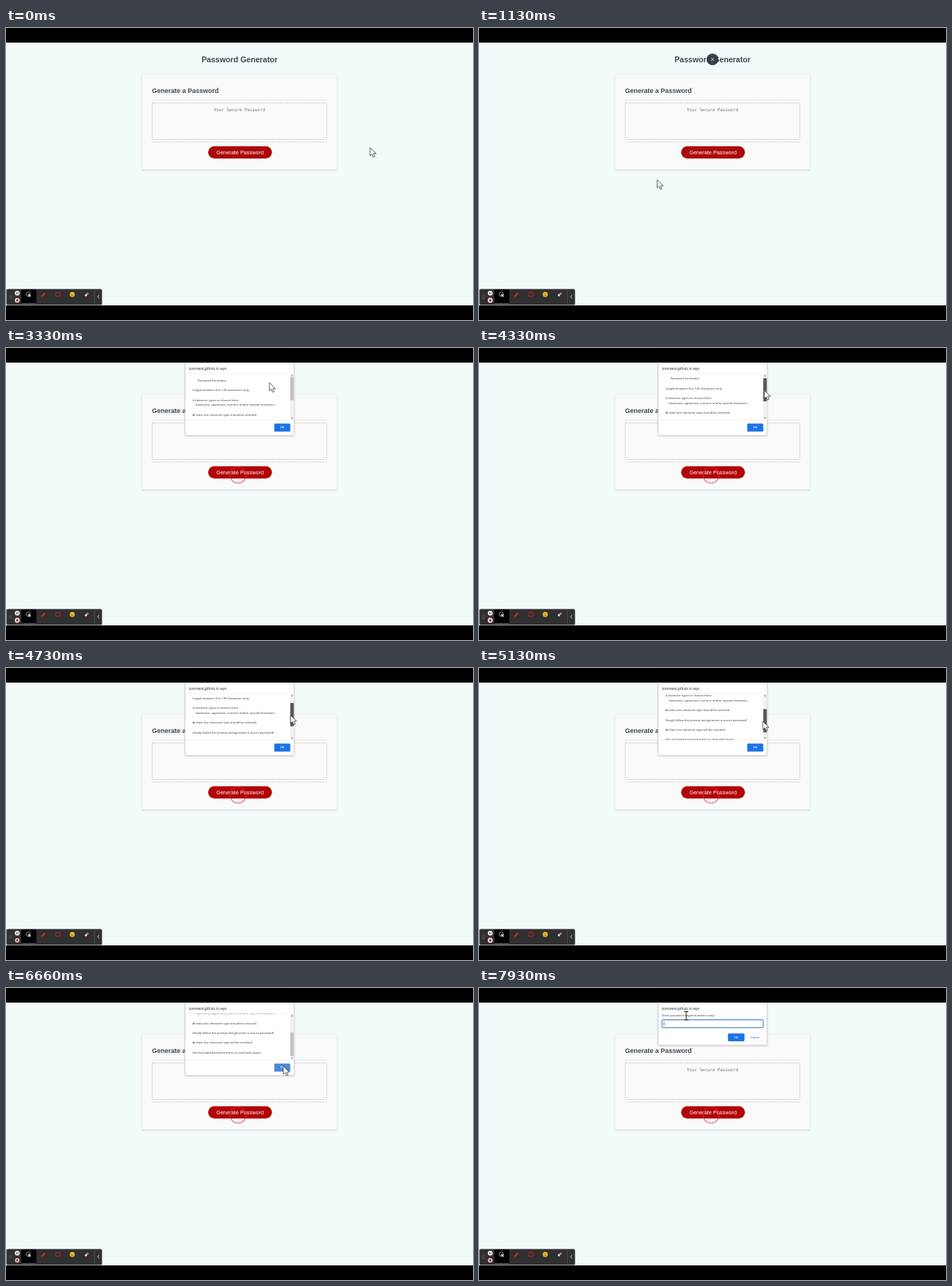
An HTML page for the animation above (8 s loop, 640x400 px).

```html
<!DOCTYPE html>
<html lang="en">
<head>
<meta charset="utf-8">
<title>Password Generator</title>
<style>
html, body { margin: 0; width: 100%; height: 100%; overflow: hidden; background: #000; }
svg { display: block; width: 640px; height: 400px; }
text { font-family: "Open Sans", "Noto Sans", sans-serif; white-space: pre; }
.page { font-family: "Liberation Sans", Arial, sans-serif; }
.mono { font-family: "DejaVu Sans Mono", monospace; }
.mid { text-anchor: middle; }
.bold { font-weight: 700; }
.body { font-size: 4.1px; fill: #333; }
.says { font-size: 4.7px; fill: #202124; }
.btn { font-size: 3.7px; font-weight: 600; text-anchor: middle; }
.tool { font-size: 2.7px; font-weight: 700; fill: #fff; text-anchor: middle; }
.cursor { fill: #fff; stroke: #333; stroke-width: .8; stroke-linejoin: round; }
</style>
</head>
<body>
<svg viewBox="0 0 640 400">
  <defs>
    <filter id="shadow" x="-10%" y="-10%" width="120%" height="125%">
      <feDropShadow dx="0" dy=".7" stdDeviation="1.3" flood-opacity=".22"/>
    </filter>
    <clipPath id="scrollArea"><rect x="246" y="35.2" width="143.5" height="63.2"/></clipPath>
  </defs>

  <rect y="20" width="640" height="360" fill="#f3fafa"/>
  <text class="page bold mid" x="320" y="46.8" font-size="10.667" fill="#3b4a54">Password Generator</text>

  <rect x="186.67" y="64" width="266.67" height="129.8" rx="1.7" fill="#fafafa" filter="url(#shadow)"/>
  <text class="page bold" x="200" y="88.6" font-size="9" fill="#3b4a54">Generate a Password</text>
  <path d="M200 98.9H440M200 156.3H440" stroke="#d5d8da" stroke-width=".7"/>
  <rect x="200.3" y="102.8" width="239.4" height="49.8" rx="1.5" fill="none" stroke="#b4b8ba" stroke-width=".75" stroke-dasharray="2 1.33"/>
  <text class="mono mid" x="320" y="114.4" font-size="5.85" fill="#757575">Your Secure Password</text>
  <rect id="generate" x="277" y="162" width="87.5" height="16.7" rx="8.35"/>
  <text class="page mid" x="320.7" y="172.8" font-size="7.333" fill="#fff">Generate Password</text>
  <circle id="ripple" cx="318" cy="174" fill="none" stroke="#e5303c" stroke-width="1.1" opacity=".75"/>

  <g id="exit">
    <circle r="8" fill="#2f3538" opacity=".92"/>
    <path d="M-2-2L2 2M2-2L-2 2" stroke="#d8dcde" stroke-width=".8"/>
  </g>

  <g id="alert">
    <rect x="245.4" y="17" width="149.4" height="102.8" rx="1" fill="#fff" stroke="#b8bcbc" stroke-width=".6" filter="url(#shadow)"/>
    <text class="says" x="250.7" y="30.2">lumotesk.github.io says</text>
    <path d="M245.7 35H394.5M245.7 98.6H394.5" stroke="#e0e0e0" stroke-width=".5"/>
    <g clip-path="url(#scrollArea)"><g id="message"></g></g>
    <rect x="389.4" y="35.2" width="5.2" height="63.2" fill="#f1f1f1"/>
    <path d="M390.7 38.4l1.3-1.5 1.3 1.5zM390.7 95.2l1.3 1.5 1.3-1.5z" fill="#505050"/>
    <rect id="thumb" x="389.6" width="4.8" height="31.8"/>
    <rect id="ok" x="367.6" y="103.4" width="22" height="11.2" rx="1.3"/>
    <text class="btn" x="378.5" y="110.4" fill="#fff">OK</text>
  </g>

  <g id="prompt">
    <rect x="245.4" y="17" width="149.4" height="61.2" rx="1" fill="#fff" stroke="#b8bcbc" stroke-width=".6" filter="url(#shadow)"/>
    <text class="says" x="250.7" y="30.2">lumotesk.github.io says</text>
    <text class="body" x="250.7" y="39.3">Enter password length(numbers only):</text>
    <rect x="250.8" y="43.6" width="138.5" height="10.7" rx="1" fill="#fff" stroke="#2a6fc9"/>
    <path id="caret" d="M253.6 46.2V51.6" stroke="#222" stroke-width=".6"/>
    <rect x="341.2" y="62.2" width="22.6" height="10.9" rx="1.3" fill="#1a73e8"/>
    <text class="btn" x="352.4" y="69" fill="#fff">OK</text>
    <rect x="366.6" y="62.4" width="22.6" height="10.5" rx="1.3" fill="#fff" stroke="#dadce0" stroke-width=".5"/>
    <text class="btn" x="378" y="69" fill="#1a73e8">Cancel</text>
  </g>

  <path d="M0 0H640V20H0zM0 380H640V400H0z"/>

  <g id="toolbar">
    <rect x=".8" y="357.8" width="130.6" height="21.4" rx="1.5" fill="#303030" stroke="#555" stroke-width=".5"/>
    <path d="M5 366V372M7.2 366V372" stroke="#999" stroke-width=".8" stroke-dasharray=".8 1.2"/>
    <circle cx="15.4" cy="363.2" r="3.3" fill="#f2f2f2"/>
    <path d="M14.5 361.8V364.6M16.3 361.8V364.6" stroke="#303030" stroke-width=".8"/>
    <circle id="ring" cx="15.4" cy="373" fill="#e9e2e2"/>
    <rect x="13.9" y="371.5" width="3" height="3" rx=".5" fill="#d3222a"/>
    <rect x="21" y="358.2" width="20.4" height="20.2" fill="#000"/>
    <path d="M21.4 377.7H41" stroke="#9fb6ba" stroke-width=".7"/>
    <circle cx="30.6" cy="364.6" r="2.9" fill="none" stroke="#ddd" stroke-width=".7"/>
    <path d="M30.4 364l4 2-1.6.6 1.1 1.7-.9.5-1-1.7-1.1 1.1z" fill="#fff"/>
    <path d="M49.2 367.4l4.2-4.2" stroke="#e0242c" stroke-width="2.2"/>
    <path d="M48 368.6l.3-1.6 1.3 1.3z" fill="#e0242c"/>
    <rect x="68.2" y="362.2" width="5.8" height="5.4" fill="none" stroke="#d8242c" stroke-width=".9" stroke-dasharray="1.7 .5"/>
    <circle cx="90.8" cy="365" r="3.4" fill="#f5c32c"/>
    <path d="M89 364.1h1.2M91.5 364.1h1.2M88.9 365.8q1.9 2.2 3.8 0" fill="none" stroke="#5b3a10" stroke-width=".7"/>
    <path d="M108.7 367l1.8-1.8" stroke="#eee" stroke-width="2.6"/>
    <path d="M110.5 365.2l2.2-2.2" stroke="#d77780" stroke-width="2.6"/>
    <path d="M121.3 359V378" stroke="#666" stroke-width=".5"/>
    <path d="M127.5 365.8l-1.8 2.4 1.8 2.4" fill="none" stroke="#eee" stroke-width=".9"/>
  </g>

  <g id="pointer">
    <path id="arrow" class="cursor" d="M0 0V11.2L2.6 8.9 4.5 13 6.5 12.1 4.7 8.2H8.3Z"/>
    <path id="hand" class="cursor" d="M-1 .8Q0-.6 1.1 .8V5.4Q2.3 4.6 3 5.8 4.3 5.1 4.9 6.4 6.4 6 6.5 7.6V10.6L5 13.6H-.9L-4.6 9Q-4.6 7.2-2.6 8L-1 9.4Z"/>
    <path id="beam" d="M-2.8-5.6H-.8L0-5 .8-5.6H2.8M0-5V5M-2.8 5.6H-.8L0 5 .8 5.6H2.8" fill="none" stroke="#222" stroke-width="1.1"/>
  </g>
</svg>
<script>
const LOOP = 8000, ALERT = 2000, PROMPT = 6730, CLICK = 1860;
const GRAB = 4200, RELEASE = 5800, MAX_SCROLL = 43, THUMB_RATIO = .49;

// time, x, y
const path = [
  [0, 499, 164], [60, 496, 160], [350, 405, 65], [560, 335, 26], [750, 298, 45],
  [930, 262, 140], [1130, 244, 208], [1400, 280, 194], [1650, 314, 174],
  [2600, 314, 174], [3000, 338, 95], [3460, 370, 29], [3800, 391, 47],
  [GRAB, 391, 56.7], [4330, 391, 58], [4700, 390, 64], [5130, 389, 73],
  [5500, 388.5, 78], [RELEASE, 388.5, 78], [6350, 380, 107], [7060, 380, 107],
  [7600, 374, 80], [7860, 370, 45], [7930, 284, 38]
];

// row, indent, text
const message = [
  [0, 7, "Password Generator:"],
  [2, 0, "Length between 8 to 128 characters only."],
  [4, 0, "4 character types to choose from:"],
  [5, 4.7, "lowercase, uppercase, numeric and/or special characters."],
  [7, 0, "At least one character type should be selected."],
  [9, 0, "Simply follow the prompt and generate a secure password!"],
  [11, 0, "At least one character type will be included."],
  [13, 0, "Has excluded password starts or ends with space."]
];

const $ = id => document.getElementById(id);
const clamp = (v, lo = 0, hi = 1) => Math.min(hi, Math.max(lo, v));
const ramp = (t, from, to) => clamp((t - from) / (to - from));
const set = (id, attrs) => {
  for (const name in attrs) $(id).setAttribute(name, attrs[name]);
};
const show = (id, on) => set(id, { visibility: on ? "visible" : "hidden" });

for (const [row, indent, words] of message) {
  const line = document.createElementNS("http://www.w3.org/2000/svg", "text");
  line.setAttribute("class", "body");
  line.setAttribute("x", 255.4 + indent);
  line.setAttribute("y", 45.9 + row * 6.68);
  line.textContent = words;
  $("message").append(line);
}

function pointerAt(t) {
  const next = path.findIndex(p => p[0] > t);
  if (next < 0) return path[path.length - 1].slice(1);
  const [t0, x0, y0] = path[next - 1], [t1, x1, y1] = path[next];
  const k = ramp(t, t0, t1);
  return [x0 + (x1 - x0) * k, y0 + (y1 - y0) * k];
}

function draw(t) {
  const [x, y] = pointerAt(t);
  const overButton = t > 1560 && t < 2680;
  const overText = t > 7740;
  set("pointer", { transform: `translate(${x} ${y})` });
  show("hand", overButton);
  show("beam", overText);
  show("arrow", !overButton && !overText);

  const exitIn = ramp(t, 560, 800), exitOut = ramp(t, 1250, 1450);
  set("exit", { transform: `translate(320 ${10 + 33 * (exitIn - exitOut)})` });

  set("generate", { fill: t > 1560 ? "#b20306" : "#ac080a" });
  set("ripple", { r: 11 * ramp(t, CLICK, ALERT) });
  show("ripple", t > CLICK);

  const dragging = t >= GRAB && t < RELEASE;
  const scroll = t < GRAB ? 0 : t >= RELEASE ? MAX_SCROLL
    : clamp((y - 56.7) / THUMB_RATIO, 0, MAX_SCROLL);
  set("message", { transform: `translate(0 ${-scroll})` });
  set("thumb", { y: 40 + scroll * THUMB_RATIO, fill: dragging ? "#565656" : "#c1c1c1" });
  set("ok", { fill: t > 6280 ? "#4a88d8" : "#1a73e8" });
  show("alert", t >= ALERT && t < PROMPT);
  show("prompt", t >= PROMPT);
  show("caret", t >= PROMPT && (t - PROMPT) % 1000 < 500);

  set("ring", { r: 3.2 + .25 * Math.sin(t / LOOP * Math.PI * 16) });
}

const start = performance.now();
function tick() {
  draw((performance.now() - start) % LOOP);
  requestAnimationFrame(tick);
}
tick();
</script>
</body>
</html>
```
